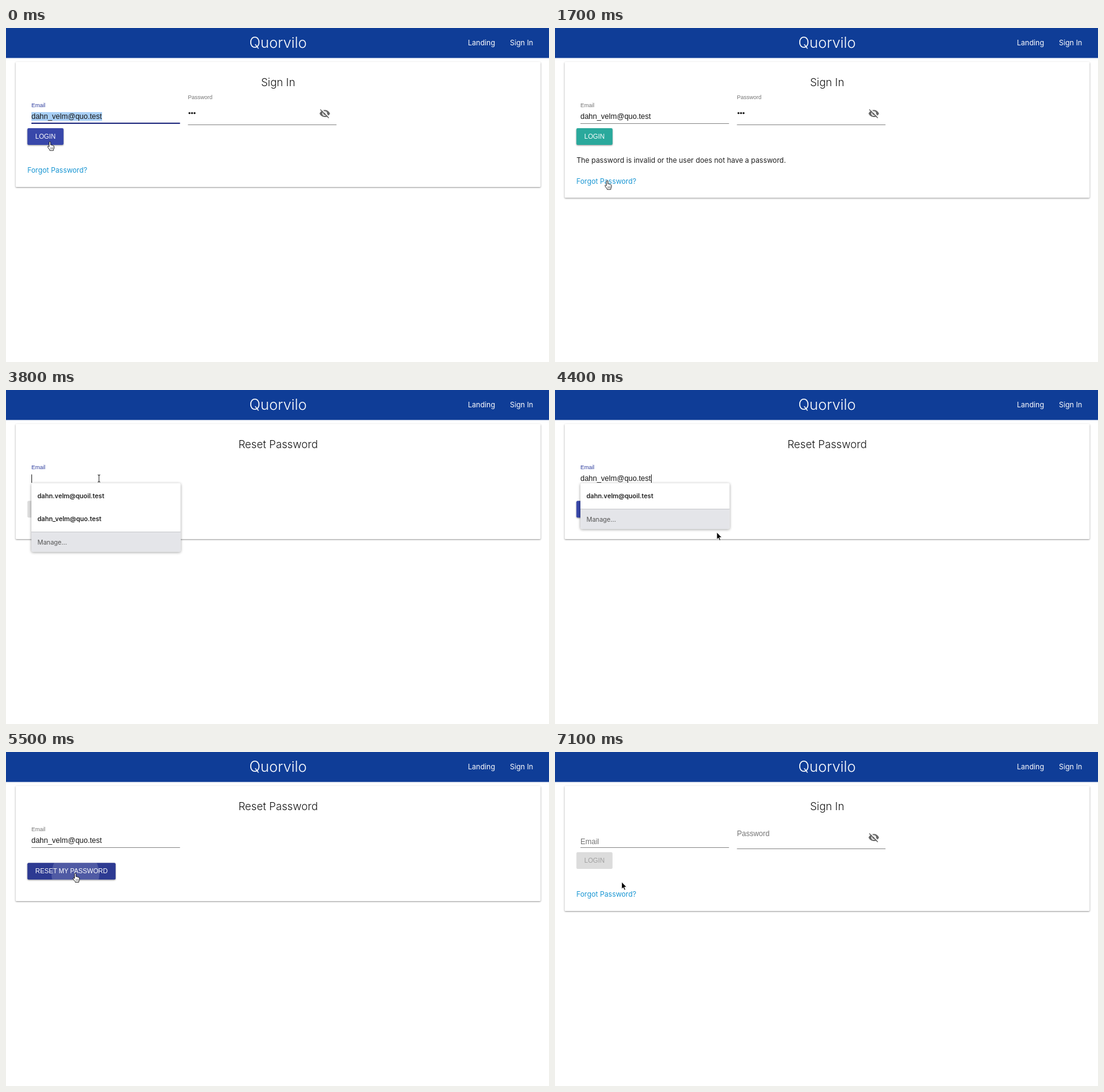
Animation, 876 px wide and 540 px high, one loop 7.3 s. Source, as an HTML page:

```html
<!DOCTYPE html>
<html lang="en">
<head>
<meta charset="utf-8">
<title>Sign in and reset password</title>
<style>
  html, body { margin: 0; width: 100%; height: 100%; overflow: hidden; background: #fff; }
  svg { display: block; width: 876px; height: 540px; }
  text { font-family: "Liberation Sans", Arial, sans-serif; white-space: pre; }
  .ui { font-family: Inter, sans-serif; }
  .card { fill: #fff; filter: drop-shadow(0 1px 1.3px rgba(0,0,0,.42)); }
  .raised { filter: drop-shadow(0 1.3px 1.3px rgba(0,0,0,.4)); }
  .popup { filter: drop-shadow(0 1px 2px rgba(0,0,0,.4)); }
</style>
</head>
<body>
<svg id="stage" viewBox="0 0 876 540"></svg>
<script>
const LOOP = 7300, STEP = 100;
const BRAND = 'Quorvilo';
const EMAIL = 'dahn_velm@quo.test';
const OTHER_EMAIL = 'dahn.velm@quoil.test';
const INDIGO = '#3847aa', DARK = '#2d3a92', TEAL = '#2aa99c', GREY = '#757575', INK = '#161616';

// Moments at which the interface changes
const LOGIN_CLICK = 100, ERROR = 600, LINK_PRESS = 1700, RESET_PAGE = 2400,
      FOCUS = 3500, PICK = 4200, BLUR = 4800, RESET_CLICK = 5300, SIGN_IN_PAGE = 6000;

// time, tip x, tip y, pointer shape from here on
const POINTER = [
  [0, 71, 184, 'hand'], [400, 71, 184, 'hand'], [500, 72, 196, 'arrow'],
  [800, 79, 234, 'arrow'], [1200, 84, 246, 'hand'], [1400, 84.5, 247, 'hand'],
  [2800, 84.5, 247, 'hand'], [2900, 95.5, 219, 'arrow'], [3400, 150, 143, 'beam'],
  [3900, 150, 143, 'beam'], [4000, 175, 190, 'arrow'], [4200, 195, 206, 'arrow'],
  [4400, 261, 230, 'arrow'], [4700, 268, 298, 'arrow'], [4900, 268, 298, 'arrow'],
  [5300, 112, 196.5, 'hand'], [6700, 112, 196.5, 'hand'],
  [6800, 111, 200, 'arrow'], [7100, 107.5, 210, 'arrow'], [LOOP, 107.5, 210, 'arrow']
];
const SHAPES = {
  arrow: '<path d="M0 0V11.6L2.6 9.2 4.4 13.3 6.3 12.5 4.5 8.5H8.1Z" fill="#000" stroke="#fff" stroke-width=".8"/>',
  hand: `<path d="M-1.5 8V1A1.2 1.2 0 0 1 .9 1V5Q2.6 4.5 3 5.6 4.5 5.2 4.9 6.3 6.5 6.2 6.5 7.8V10Q6.4 11.7 5.5 12.7V14H-.4V13
    Q-2 11.3-3.6 8.7-4.2 7.2-3.2 7-2.4 7-1.5 8Z" fill="#fff" stroke="#111" stroke-width=".9"/>
    <path d="M1 9V12M2.8 9V12M4.5 9V12" stroke="#333" stroke-width=".6"/>`,
  beam: '<path d="M-2-6Q0-6 0-4.5 0-6 2-6M0-5V5M-2 6Q0 6 0 4.5 0 6 2 6" fill="none" stroke="#222"/>'
};

const clamp = v => Math.max(0, Math.min(1, v));
const mix = (a, b, p) => a + (b - a) * p;
const easeOut = p => 1 - (1 - clamp(p)) ** 3;
const smooth = p => p * p * (3 - 2 * p);

const rect = (x, y, w, h, attrs) => `<rect x="${x}" y="${y}" width="${w}" height="${h}" ${attrs}/>`;
const circle = (x, y, r, fill) => `<circle cx="${x}" cy="${y}" r="${r}" fill="${fill}"/>`;
const text = (str, x, y, size, fill, attrs = '') =>
  `<text x="${x}" y="${y}" font-size="${size}" fill="${fill}" ${attrs}>${str}</text>`;
const ui = (str, x, y, size, fill, attrs = '') => text(str, x, y, size, fill, `class="ui" ${attrs}`);
const CENTER = 'text-anchor="middle"';

function label(str, x, y, raised, color) {
  return text(str, x, mix(y, y - 20.5, raised), mix(12, 9, raised), color);
}

function emailField({ value = '', focused = false, raised = 0, selected = false, caret = false }) {
  const line = focused ? rect(41, 153, 239.7, 2, 'fill="#242d80"') : rect(41, 154, 239.7, 1, 'fill="#8b8b8b"');
  return line
    + (selected ? rect(41, 136, 114, 14, 'fill="#a9d0f7"') : '')
    + label('Email', 41, 148.5, raised, focused ? '#303f9f' : GREY)
    + text(value, 41, 147.3, 12, INK)
    + (caret ? rect(value ? 155 : 41, 136.5, 1, 13.5, 'fill="#222"') : '');
}

function passwordField(filled) {
  const eye = `<g transform="translate(505 129) scale(.77)">
    <path d="M1 12Q4.5 4.5 12 4.5T23 12Q19.5 19.5 12 19.5T1 12Z" fill="#666"/>
    ${circle(12, 12, 5, '#fff')}${circle(12, 12, 3, '#666')}
    <path d="M4 1.8L22.2 20" stroke="#fff" stroke-width="2"/>
    <path d="M2.6 3.6L20.4 21.4" stroke="#666" stroke-width="1.9"/></g>`;
  const dots = [296, 300.1, 304.2].map(x => circle(x, 137.6, 1.6, INK)).join('');
  return label('Password', 293.5, 135.5, filled ? 1 : 0, GREY)
    + (filled ? dots : '') + eye + rect(293.5, 156, 239.7, 1, 'fill="#8b8b8b"');
}

function button(str, y, width, fill, ripple = '') {
  const off = !fill;
  return rect(34.5, y, width, 27, `rx="2" fill="${fill || '#dcdcdc'}" ${off ? '' : 'class="raised"'}`)
    + `<clipPath id="face">${rect(34.5, y, width, 27, 'rx="2"')}</clipPath><g clip-path="url(#face)">${ripple}</g>`
    + text(str, 34.5 + width / 2, y + 16.7, 10.5, off ? '#a0a0a0' : '#fff', CENTER);
}

function ripple(age, x, y) {
  if (age < 0 || age > 700) return '';
  const alpha = .16 * clamp((700 - age) / 400);
  return circle(x, y, 76 * easeOut(age / 950), `rgba(255,255,255,${alpha})`);
}

function dropdown(rows) {
  const bottom = 192 + 37 * (rows.length - 1);
  return `<g class="popup">${rect(41, 150.5, 240.7, bottom - 118, 'rx="2.5" fill="#fff"')}</g>`
    + rows.map((row, i) =>
        (row.hover ? rect(41, 154.5 + 37 * i, 240.7, 37, 'fill="#ececf0"') : '')
        + ui(row.name, 50.7, 175 + 37 * i, 10.2, '#222', 'font-weight="600"')).join('')
    + `<path d="M41 ${bottom}h240.7v30q0 2.5-2.5 2.5H43.5q-2.5 0-2.5-2.5z" fill="#e4e5e9"/>`
    + rect(41, bottom, 240.7, .8, 'fill="#c4c5c8"')
    + ui('Manage...', 50.7, bottom + 20.7, 10.2, '#555');
}

function shell(heading, bottom) {
  return rect(0, 0, 876, 48.5, 'fill="#0f3d97"')
    + ui(BRAND, 439, 32, 23.6, '#fff', CENTER + ' font-weight="300"')
    + ui('Landing', 745.3, 28.2, 11.6, '#fff')
    + ui('Sign In', 813, 28.2, 11.6, '#fff')
    + rect(15.5, 54.8, 847, bottom - 54.8, 'rx="1.5" class="card"')
    + ui(heading, 439, 94, 17.3, INK, CENTER + ' font-weight="300"');
}

function signIn(t) {
  const filled = t < RESET_PAGE, failed = filled && t >= ERROR, fresh = t < LOGIN_CLICK;
  const shift = failed ? 17.5 : 0;
  const fill = !filled ? '' : fresh ? INDIGO : t < LINK_PRESS ? DARK : TEAL;
  return shell('Sign In', 257 + shift)
    + emailField({ value: filled ? EMAIL : '', raised: filled ? 1 : 0, focused: fresh, selected: fresh })
    + passwordField(filled)
    + button('LOGIN', 162, 58.3, fill, ripple(t - LOGIN_CLICK, 71, 184))
    + (failed ? ui('The password is invalid or the user does not have a password.', 34.7, 218, 11.48, '#222') : '')
    + ui('Forgot Password?', 34.5, 234 + shift, 11.4, '#1996d3');
}

function resetPassword(t) {
  const focused = t >= FOCUS && t < BLUR, picked = t >= PICK;
  const rows = [{ name: OTHER_EMAIL }];
  if (!picked) rows.push({ name: EMAIL, hover: t >= 4000 });
  return shell('Reset Password', 241)
    + emailField({ value: picked ? EMAIL : '', focused, raised: easeOut((t - FOCUS) / 300), caret: focused })
    + button('RESET MY PASSWORD', 179.3, 142.3, !picked ? '' : t < RESET_CLICK ? INDIGO : DARK,
        ripple(t - RESET_CLICK, 112, 197))
    + (focused ? dropdown(rows) : '');
}

function pointer(t) {
  const i = POINTER.findIndex(key => key[0] > t);
  const [t0, x0, y0, shape] = POINTER[i - 1], [t1, x1, y1] = POINTER[i];
  const p = smooth((t - t0) / (t1 - t0));
  return `<g transform="translate(${mix(x0, x1, p)} ${mix(y0, y1, p)})">${SHAPES[shape]}</g>`;
}

const stage = document.getElementById('stage');
let shown = -1;

function tick() {
  const t = Math.floor(performance.now() % LOOP / STEP) * STEP;
  if (t !== shown) {
    const resetting = t >= RESET_PAGE && t < SIGN_IN_PAGE;
    stage.innerHTML = (resetting ? resetPassword(t) : signIn(t)) + pointer(t);
    shown = t;
  }
  requestAnimationFrame(tick);
}
tick();
</script>
</body>
</html>
```
